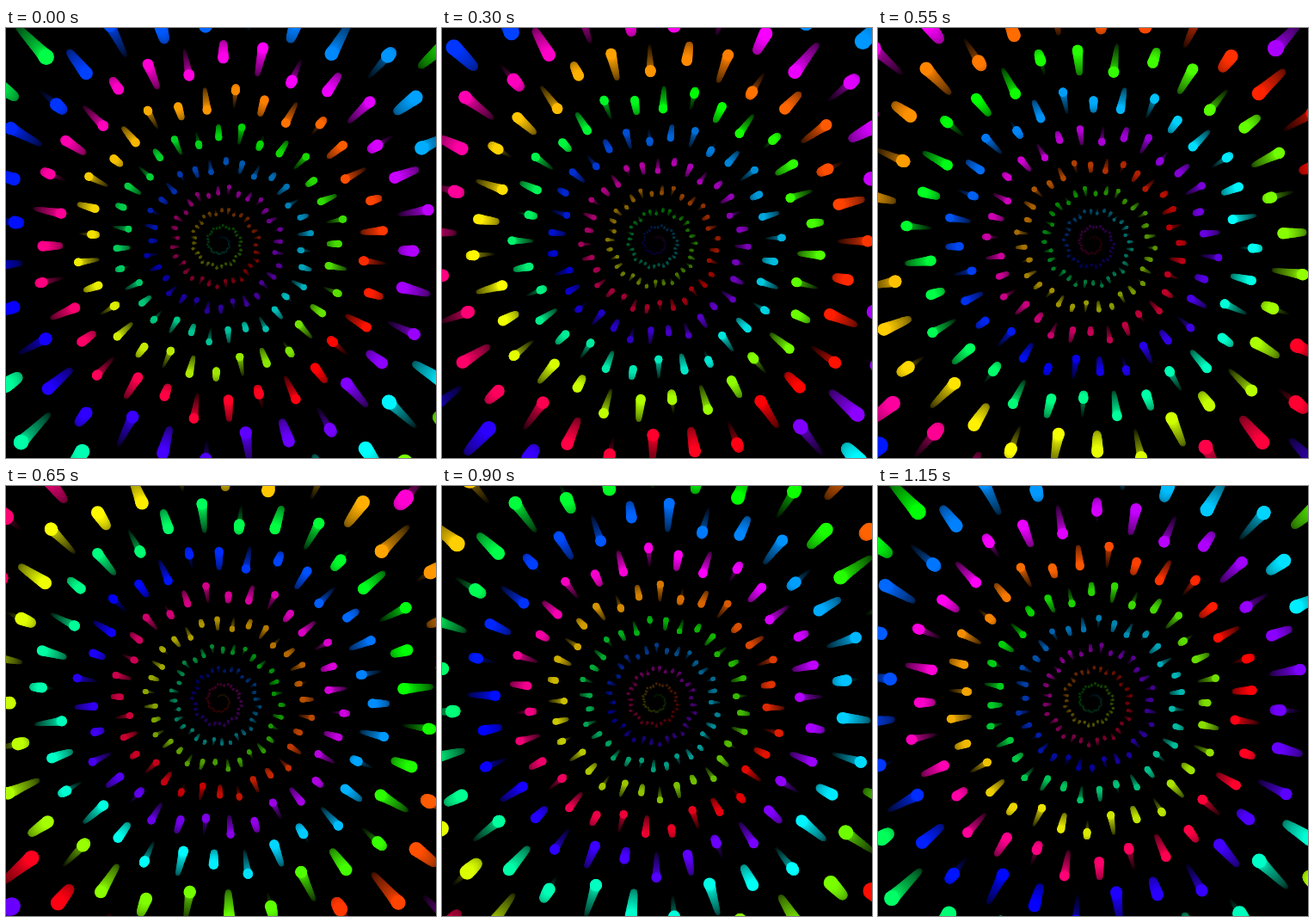
These frames come from a looping animation (500 px wide and 500 px high, 1.2 s). An HTML page with a canvas:

```html
<!DOCTYPE html>
<html lang="en">
<head>
<meta charset="utf-8">
<title>Spiral of swinging dots</title>
<style>
html, body { margin: 0; width: 100%; height: 100%; overflow: hidden; background: #000; }
canvas { display: block; width: 500px; height: 500px; }
</style>
</head>
<body>
<canvas id="stage" width="500" height="500"></canvas>
<script>
const ctx = document.getElementById('stage').getContext('2d');
const TAU = Math.PI * 2;
const LOOP = 1200, STEP = 50;
const FIRST = 46, LAST = 374;   // dots along the spiral
const REF = 237;                // dot at which angle, phase and hue are anchored
const TURN = 0.2;               // radians between neighbours
const SWING = 0.076;            // radial swing relative to the radius
const TRAIL = 3.4;              // trail length in radians of phase
const PARTS = 26;

function drawDot(n, t) {
  const d = n - REF;
  const base = 2.96 * (n * TURN / TAU) ** 2;
  const angle = TURN * d - 1.4757;
  const phase = 2.33 - 2 * d + TAU * t;
  const hue = (((33 - 2.85 * d + 360 * t) % 360) + 360) % 360;
  const light = 50 * Math.min(1, (n - 30) / 210);
  const size = 0.8 + 0.026 * base;
  const cx = Math.cos(angle), cy = Math.sin(angle);

  for (let k = PARTS; k >= 0; k--) {
    const age = k / PARTS;
    const r = base * (1 + SWING * Math.sin(phase - TRAIL * age));
    ctx.fillStyle = `hsl(${hue} 100% ${light * (1 - age)}%)`;
    ctx.beginPath();
    ctx.arc(250 + r * cx, 250 + r * cy, size * (1 - 0.8 * age), 0, TAU);
    ctx.fill();
  }
}

function draw(t) {
  ctx.fillStyle = '#000';
  ctx.fillRect(0, 0, 500, 500);
  for (let i = FIRST; i < LAST; i++) drawDot(i - t, t);
}

let start = null, last = -1;
function tick(now) {
  if (start === null) start = now;
  const step = Math.floor(((now - start) % LOOP) / STEP);
  if (step !== last) {
    draw(step * STEP / LOOP);
    last = step;
  }
  requestAnimationFrame(tick);
}
draw(0);
requestAnimationFrame(tick);
</script>
</body>
</html>
```
